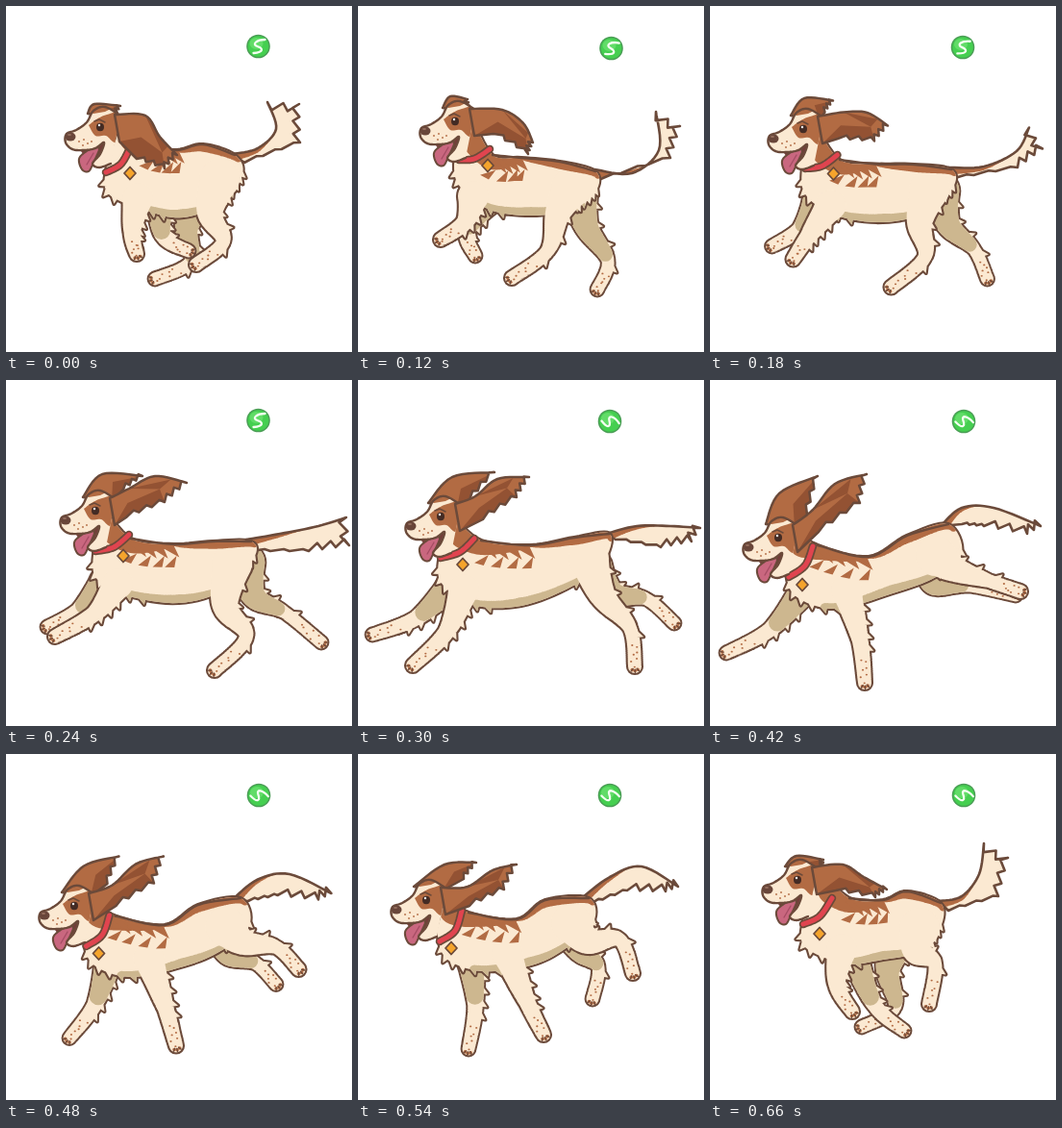
Recreate the animation shown at these times as an HTML page with a canvas. Size 360 by 360 pixels, loop 720 ms.

```html
<!DOCTYPE html>
<html lang="en">
<head>
<meta charset="utf-8">
<title>Running dog</title>
<style>
html, body { margin: 0; width: 100%; height: 100%; overflow: hidden; background: #fff; }
canvas { display: block; width: 360px; height: 360px; }
</style>
</head>
<body>
<canvas id="stage" width="360" height="360"></canvas>
<script>
const ctx = document.getElementById('stage').getContext('2d');
const LINE = '#6b4a3a', CREAM = '#fbe9d2', BROWN = '#b26b43', DARK = '#935233', SHADE = '#cdb78f';
const STEP = 60, STEPS = 12;

// Key poses by step; every list holds x,y pairs along the part.
const poses = {
  0: {
    ball: [262.5, 42, 0], nose: [67, 136], collar: [128, 150, 119, 165, 104, 173], tag: [129, 174],
    ear: [145, 114, 160, 136, 178, 155, 165, 169, 136, 159], farEar: [92, 102, 119, 104, 114, 114],
    tail: [236, 154, 262, 148, 281, 128, 272, 100, 305, 102, 306, 142, 248, 163],
    body: [122, 118, 150, 145, 178, 150, 205, 144, 238, 155, 246, 175, 225, 205, 185, 220, 150, 214, 106, 195, 105, 165],
    hind: [222, 180, 212, 215, 226, 245, 198, 269], farHind: [200, 195, 188, 230, 192, 266, 155, 284],
    lead: [137, 200, 131, 235, 136, 258], trail: [160, 205, 164, 240, 190, 255]
  },
  2: {
    ball: [263.5, 44, .2], nose: [70, 130], collar: [137, 149, 121, 159, 105, 160], tag: [135, 166],
    ear: [150, 108, 172, 122, 182, 142, 177, 154, 141, 133], farEar: [96, 94, 114, 97, 117, 107],
    tail: [246, 170, 285, 174, 313, 150, 310, 110, 335, 125, 325, 158, 248, 182],
    body: [118, 115, 140, 155, 170, 158, 210, 162, 247, 172, 248, 192, 225, 211, 180, 218, 135, 211, 104, 185, 100, 158],
    hind: [222, 189, 208, 215, 197, 255, 160, 283], farHind: [230, 195, 238, 230, 260, 265, 249, 295],
    lead: [120, 198, 111, 225, 86, 243], trail: [135, 203, 113, 235, 122, 260]
  },
  4: {
    ball: [262.5, 42, 0], nose: [62, 146], collar: [128, 161, 112, 174, 93, 178], tag: [122, 183],
    ear: [128, 113, 155, 100, 188, 107, 165, 127, 125, 143], farEar: [100, 98, 142, 100, 122, 114],
    tail: [250, 166, 285, 160, 325, 152, 354, 143, 357, 172, 315, 178, 255, 178],
    body: [100, 130, 130, 165, 175, 171, 215, 168, 255, 168, 258, 185, 228, 218, 180, 232, 125, 224, 93, 205, 92, 172],
    hind: [235, 191, 228, 235, 250, 267, 217, 302], farHind: [250, 190, 258, 225, 290, 242, 328, 273],
    lead: [102, 210, 75, 240, 43, 257], trail: [116, 212, 92, 243, 51, 267]
  },
  5: {
    ball: [262, 43, 1], nose: [55, 152], collar: [121, 165, 106, 179, 86, 185], tag: [109, 192],
    ear: [122, 121, 145, 103, 178, 101, 165, 122, 130, 145], farEar: [98, 101, 142, 96, 116, 125],
    tail: [258, 160, 290, 152, 325, 152, 356, 154, 347, 168, 315, 174, 268, 166],
    body: [98, 140, 128, 167, 180, 172, 225, 164, 262, 160, 255, 190, 222, 215, 170, 235, 120, 234, 86, 210, 85, 180],
    hind: [240, 186, 255, 225, 283, 258, 288, 298], farHind: [245, 195, 265, 222, 300, 228, 329, 253],
    lead: [97, 214, 60, 248, 15, 265], trail: [110, 218, 92, 262, 57, 297]
  },
  7: {
    ball: [264, 43, .9], nose: [40, 174], collar: [107, 173, 99, 193, 82, 205], tag: [96, 213],
    ear: [107, 135, 130, 108, 163, 98, 156, 128, 113, 158], farEar: [72, 118, 112, 100, 101, 140],
    tail: [240, 152, 262, 133, 295, 133, 344, 152, 330, 160, 285, 152, 262, 150],
    body: [88, 155, 112, 172, 165, 184, 205, 162, 248, 150, 262, 180, 235, 205, 190, 222, 130, 238, 88, 224, 78, 195],
    hind: [235, 183, 255, 197, 290, 209, 323, 220], farHind: [232, 195, 235, 212, 270, 214, 318, 224],
    lead: [97, 220, 62, 260, 17, 284], trail: [142, 218, 156, 270, 161, 315]
  },
  9: {
    ball: [262, 43, .9], nose: [40, 162], collar: [108, 163, 101, 184, 85, 195], tag: [97, 202],
    ear: [114, 138, 140, 121, 165, 115, 152, 141, 116, 158], farEar: [90, 115, 123, 113, 110, 130],
    tail: [230, 152, 262, 128, 295, 117, 333, 138, 320, 143, 280, 142, 242, 156],
    body: [92, 148, 115, 165, 165, 172, 195, 152, 240, 150, 245, 175, 215, 203, 180, 220, 130, 226, 92, 213, 82, 185],
    hind: [222, 176, 240, 195, 272, 193, 286, 228], farHind: [222, 185, 232, 205, 250, 222, 244, 255],
    lead: [117, 212, 122, 262, 115, 307], trail: [155, 207, 176, 258, 193, 292]
  },
  11: {
    ball: [264, 43, .9], nose: [60, 141], collar: [127, 150, 114, 169, 97, 177], tag: [114, 187],
    ear: [138, 115, 160, 128, 184, 141, 172, 149, 131, 142], farEar: [90, 106, 118, 110, 118, 118],
    tail: [238, 153, 262, 148, 280, 125, 285, 93, 310, 108, 300, 148, 248, 163],
    body: [115, 120, 145, 150, 180, 152, 205, 143, 240, 155, 240, 180, 220, 205, 180, 214, 140, 218, 98, 200, 97, 172],
    hind: [218, 181, 214, 205, 234, 218, 228, 260], farHind: [195, 195, 185, 225, 192, 264, 158, 284],
    lead: [137, 203, 132, 240, 148, 268], trail: [150, 210, 172, 262, 202, 288]
  }
};
// In-between steps are halfway between their neighbours.
for (let s = 0; s < STEPS; s++) {
  if (poses[s]) continue;
  const a = poses[s - 1], b = poses[s + 1];
  poses[s] = {};
  for (const part in a) poses[s][part] = a[part].map((v, i) => (v + b[part][i]) / 2);
}

const pairs = flat => flat.reduce((out, v, i) => (i % 2 ? out[out.length - 1].push(v) : out.push([v]), out), []);

// Point on a Catmull-Rom curve at u, counted in control points.
function at(pts, u) {
  const last = pts.length - 1, i = Math.max(0, Math.min(Math.floor(u), last - 1)), t = u - i;
  const [a, b, c, d] = [-1, 0, 1, 2].map(k => pts[Math.max(0, Math.min(last, i + k))]);
  return [0, 1].map(k => b[k] + t / 2 * (c[k] - a[k] + t * (2 * a[k] - 5 * b[k] + 4 * c[k] - d[k]
    + t * (3 * (b[k] - c[k]) + d[k] - a[k]))));
}

function smooth(pts) {
  const out = [];
  for (let k = 0; k <= (pts.length - 1) * 8; k++) out.push(at(pts, k / 8));
  return out;
}

function poly(pts, close = true) {
  const path = new Path2D();
  pts.forEach(p => path.lineTo(...p));
  if (close) path.closePath();
  return path;
}

// Jagged edge from a to b, without a itself.
function jag(a, b, n, depth) {
  const dx = b[0] - a[0], dy = b[1] - a[1], len = Math.hypot(dx, dy) || 1, out = [];
  for (let k = 1; k <= n; k++) {
    const v = (k - .7) / n;
    out.push([a[0] + dx * v - dy / len * depth, a[1] + dy * v + dx / len * depth]);
    out.push([a[0] + dx * k / n, a[1] + dy * k / n]);
  }
  return out;
}

// Round beads along a curve give a limb of varying width.
function beads(pts, from, to, radius) {
  const path = new Path2D();
  for (let u = from; u <= to + 1e-6; u += .05) {
    const [x, y] = at(pts, u), r = Math.max(0, radius(u));
    path.moveTo(x + r, y);
    path.arc(x, y, r, 0, 7);
  }
  return path;
}

// Fur points along a curve, to the left of its direction.
function tufts(path, pts, from, to, n, len, sweep, offset = () => 0) {
  for (let k = 0; k < n; k++) {
    const u = from + (to - from) * k / Math.max(1, n - 1), [x, y] = at(pts, u), q = at(pts, u + .02);
    const d = Math.hypot(q[0] - x, q[1] - y) || 1, tx = (q[0] - x) / d, ty = (q[1] - y) / d, o = offset(u);
    const put = (along, out) => [x + tx * along + ty * out, y + ty * along - tx * out];
    path.addPath(poly([put(-5, o - 3), put(sweep, o + len), put(5, o - 3)]));
  }
}

function fill(path, color) { ctx.fillStyle = color; ctx.fill(path); }
function line(path, color = LINE, width = 2.4) {
  ctx.strokeStyle = color; ctx.lineWidth = width; ctx.stroke(path);
}
function inside(path, paint) { ctx.save(); ctx.clip(path); paint(); ctx.restore(); }
function dot(x, y, rx, ry, color) {
  ctx.fillStyle = color; ctx.beginPath(); ctx.ellipse(x, y, rx, ry, 0, 0, 7); ctx.fill();
}

function limb(flat, widths) {
  const pts = pairs(flat), end = pts.length - 1;
  const radius = u => {
    const i = Math.min(Math.floor(u), end - 1);
    return widths[i] + (widths[i + 1] - widths[i]) * (u - i);
  };
  const path = beads(pts, 0, end, radius);
  tufts(path, pts, .45, end - .85, 4, 4, 6, radius);
  return { path, pts, end, top: beads(pts, 0, end - 1.2, radius) };
}

function paw({ pts, end }) {
  const [x, y] = pts[end], [px, py] = at(pts, end - .2), a = Math.atan2(y - py, x - px);
  for (let k = 0; k < 7; k++) {
    const p = at(pts, end - .1 - k * .085);
    dot(p[0] + Math.sin(k * 2.4) * 3.5, p[1] + Math.cos(k * 3.1) * 3, 1.1, .9, BROWN);
  }
  for (const k of [-.7, 0, .7]) {
    const c = Math.cos(a + k), s = Math.sin(a + k);
    dot(x + c * 4.5, y + s * 4.5, 1.8, 1.8, BROWN);
    line(poly([[x + c * 3, y + s * 3], [x + c * 6.5, y + s * 6.5]], false), LINE, 1.2);
  }
}

function drawFarLeg(leg) {
  line(leg.path, LINE, 4);
  fill(leg.path, CREAM);
  fill(leg.top, SHADE);
  paw(leg);
}

function drawTail(flat) {
  const p = pairs(flat), edge = p.slice(0, 4);
  const path = poly([...smooth(edge), ...jag(p[3], p[4], 2, 8), ...jag(p[4], p[5], 3, 7), ...jag(p[5], p[6], 3, 2)]);
  fill(path, CREAM);
  inside(path, () => fill(beads(edge, 0, 1.5, u => 8 - u * 4.5), BROWN));
  line(path, LINE, 2.6);
}

function drawBody(flat, legs) {
  const pts = pairs(flat), path = poly(smooth(pts));
  tufts(path, pts, 4.9, 5.8, 5, 4, 6);
  tufts(path, pts, 7.7, 9.4, 7, 5, -5);
  [path, ...legs.map(leg => leg.path)].forEach(p => line(p, LINE, 4.2));
  fill(path, CREAM);
  inside(path, () => fill(beads(pts, 5.8, 8.2, u => 9 - 3 * Math.abs(u - 7)), SHADE));
  legs.forEach(leg => { fill(leg.path, CREAM); paw(leg); });
  inside(path, () => {
    const patch = beads(pts, .6, 2, u => 13 * (2 - u) + 2);
    tufts(patch, pts, 1.9, 1.1, 4, 9, 7, () => -21);
    fill(patch, BROWN);
    // Strands trail off the shoulder and the loin.
    for (const u of [1.1, 1.35, 1.6, 1.85]) {
      const [x, y] = at(pts, u);
      fill(poly([[x - 9, y + 2], [x + 12, y + 23 - u * 5], [x + 6, y + 1]]), BROWN);
    }
    fill(beads(pts, 2, 4.2, u => 2 + 6 * Math.sin((u - 2) * 1.25)), BROWN);
  });
  line(poly(smooth(pts.slice(1, 5)), false));
}

function drawEar(path, streak) {
  fill(path, BROWN);
  inside(path, () => streak.forEach(s => fill(s, DARK)));
  line(path, LINE, 2.5);
}

function drawHead({ nose, ear, farEar, collar, tag }) {
  const [nx, ny] = nose, local = flat => pairs(flat).map(([x, y]) => [x + nx, y + ny]);
  const far = pairs(farEar), near = pairs(ear);

  const [r1, r2] = local([18, -24, 48, -20]);
  const farPath = poly([...smooth([r1, far[0], far[1]]), ...jag(far[1], far[2], 3, 4), r2]);
  drawEar(farPath, [poly([r2, [(far[0][0] + far[2][0]) / 2, (far[0][1] + far[2][1]) / 2], far[1], far[2]])]);

  const band = poly(smooth(pairs(collar)), false);
  line(band, LINE, 8.5);
  line(band, '#e0444f', 5);

  fill(poly(local([8, 11, 35, 5, 31, 26, 20, 27])), '#743c3a');
  const tongue = poly(smooth(local([29, 10, 17, 15, 9, 23, 12, 34, 19, 36, 24, 27, 30, 14])));
  fill(tongue, '#c9677f');
  line(tongue, LINE, 2);
  line(poly(local([24, 17, 17, 29]), false), '#a54c64', 1.3);

  const face = poly(smooth(local([52, -22, 36, -31, 24, -27, 17, -15, 6, -7, -4, -3, -5, 6, 2, 13, 14, 14,
    26, 12, 35, 6, 31, 18, 23, 28, 30, 32, 42, 28])), false);
  fill(face, CREAM);
  inside(face, () => {
    fill(poly(smooth(local([19, -12, 27, -18, 38, -23, 54, -24, 58, 4, 46, 6, 37, -1, 26, -1, 19, -12]))), BROWN);
    fill(poly(local([12, -30, 24, -31, 48, -32, 36, -26, 24, -24])), BROWN);
  });
  line(face);
  dot(nx, ny, 5.5, 4.5, '#69463a');
  dot(nx - 1, ny - 2, 2, 1, '#96705f');
  dot(nx + 31, ny - 10, 4, 4.2, '#432b24');
  dot(nx + 30, ny - 12, 1.2, 1.2, '#fff');
  line(poly(local([25, -16, 30, -18, 36, -15]), false), LINE, 1.5);
  for (const [x, y] of local([9, 5, 14, 3, 18, 7, 13, 9, 22, 5])) dot(x, y, .9, .9, BROWN);

  const [e1, e2] = local([46, -23, 51, 5]);
  const nearPath = poly([...smooth([e1, ...near.slice(0, 3)]), ...jag(near[2], near[3], 3, 5),
    ...jag(near[3], near[4], 3, 4), e2]);
  const mid = (a, b) => [(a[0] + b[0]) / 2, (a[1] + b[1]) / 2];
  drawEar(nearPath, [
    poly([e2, mid(near[0], near[4]), mid(near[1], near[3]), near[3], near[4]]),
    poly([near[0], mid(near[1], near[2]), mid(near[1], near[3])])
  ]);

  const [tx, ty] = tag, badge = poly([[tx, ty - 6.5], [tx + 6, ty], [tx, ty + 6.5], [tx - 6, ty]]);
  fill(badge, '#f5a42c');
  line(badge, LINE, 1.8);
}

function drawBall([x, y, spin]) {
  dot(x, y, 12.3, 12.3, '#4a9d55');
  dot(x, y, 10.8, 10.8, '#45cf50');
  dot(x - 2, y - 3, 7, 6, '#62dc68');
  ctx.save();
  ctx.translate(x, y);
  ctx.rotate(spin);
  line(new Path2D('M7 -7C-2 -7 -7 -2 -1 0S6 6 -5 7'), '#f4fff1', 2.3);
  ctx.restore();
}

function draw(step) {
  const pose = poses[step], leadNear = step > 9 || step < 3;
  const hindWidths = [21, 13, 7, 7], foreWidths = [16, 8.5, 7];
  const [near, far] = leadNear ? [pose.lead, pose.trail] : [pose.trail, pose.lead];
  ctx.fillStyle = '#fff';
  ctx.fillRect(0, 0, 360, 360);
  drawBall(pose.ball);
  drawFarLeg(limb(pose.farHind, hindWidths.map(w => w * .92)));
  drawFarLeg(limb(far, foreWidths.map(w => w * .92)));
  drawTail(pose.tail);
  drawBody(pose.body, [limb(pose.hind, hindWidths), limb(near, foreWidths)]);
  drawHead(pose);
}

ctx.lineJoin = ctx.lineCap = 'round';
let shown = -1;
function tick() {
  const step = Math.floor(performance.now() / STEP) % STEPS;
  if (step !== shown) draw(shown = step);
  requestAnimationFrame(tick);
}
tick();
</script>
</body>
</html>
```
